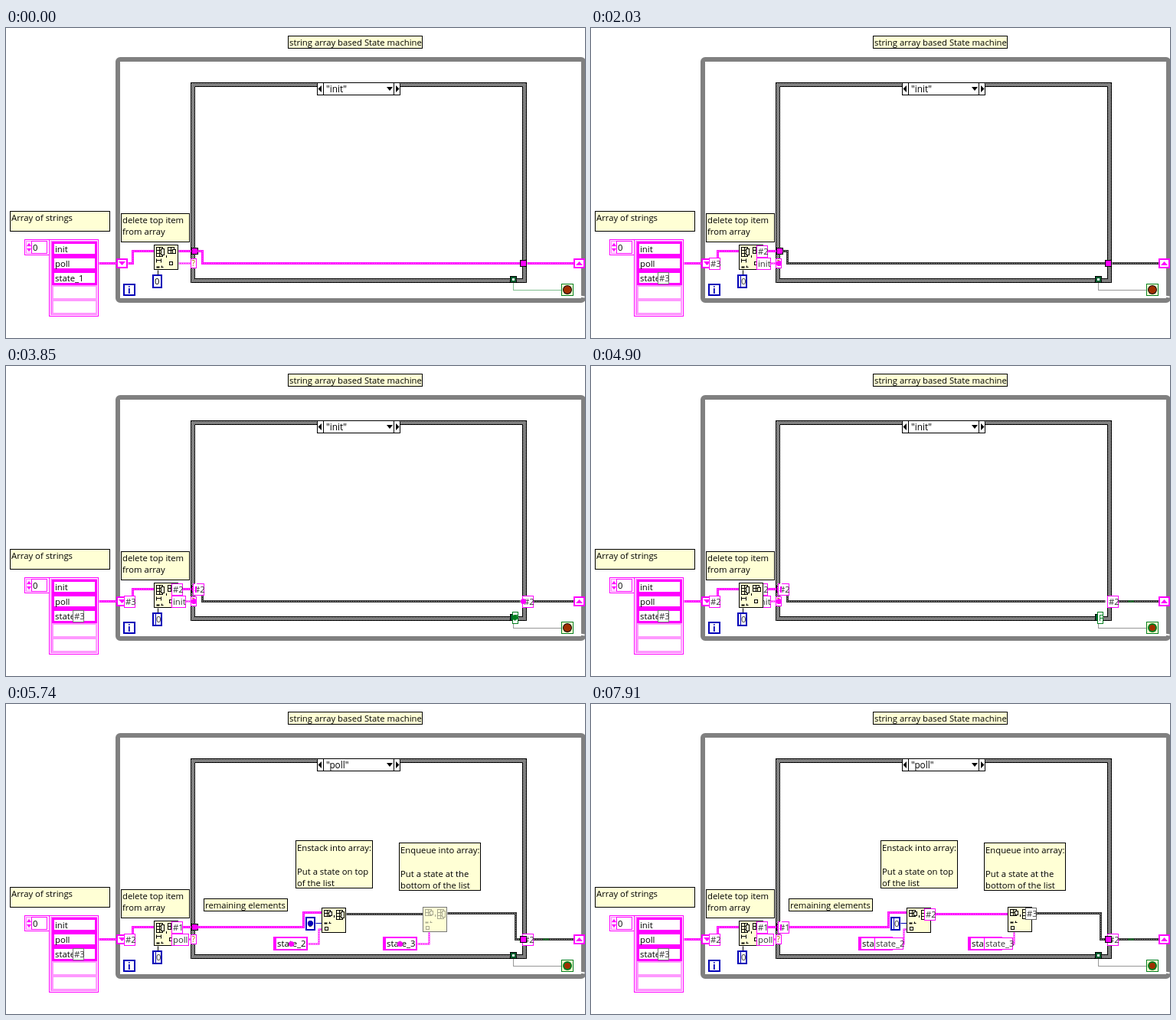
Animation, 756 px wide and 405 px high, one loop 8 s. Source, as an HTML page with a canvas:

```html
<!DOCTYPE html>
<html lang="en">
<head>
<meta charset="utf-8">
<title>State machine</title>
<style>
  html, body { margin: 0; width: 100%; height: 100%; overflow: hidden; background: #fff; }
  canvas { display: block; }
</style>
</head>
<body>
<canvas id="stage" width="756" height="405"></canvas>
<script>
const ctx = document.getElementById('stage').getContext('2d');
const LOOP = 8000, STEP = 70, STRIDE = 46;
const PINK = '#ff00ff', BLUE = '#0000b8', GREEN = '#007f1f', DARK = '#303030', CREAM = '#ffffd5';
let now = 0;

const during = (from, to = LOOP) => now >= from && now < to;

const tile = document.createElement('canvas');
tile.width = tile.height = 2;
const tileCtx = tile.getContext('2d');
tileCtx.fillStyle = '#fff';
tileCtx.fillRect(0, 0, 2, 2);
tileCtx.fillStyle = '#000';
tileCtx.fillRect(0, 0, 1, 1);
tileCtx.fillRect(1, 1, 1, 1);
const checker = ctx.createPattern(tile, 'repeat');

function rect(x, y, w, h, fill) {
  ctx.fillStyle = fill;
  ctx.fillRect(x, y, w, h);
}

function box(x, y, w, h, fill, border, line = 1) {
  rect(x, y, w, h, border);
  rect(x + line, y + line, w - 2 * line, h - 2 * line, fill);
}

function text(str, x, y, color = '#000', size = 11.3, weight = 'normal') {
  ctx.font = `${weight} ${size}px "Open Sans", "Noto Sans", sans-serif`;
  ctx.fillStyle = color;
  ctx.fillText(str, x, y);
}

function polygon(points, fill) {
  ctx.beginPath();
  points.forEach(([x, y]) => ctx.lineTo(x, y));
  ctx.fillStyle = fill;
  ctx.fill();
}

function circle(x, y, r, fill) {
  ctx.beginPath();
  ctx.arc(x, y, r, 0, 2 * Math.PI);
  ctx.fillStyle = fill;
  ctx.fill();
}

function line(points, color, width = 1, dash = []) {
  ctx.beginPath();
  points.forEach(([x, y]) => ctx.lineTo(x + .5, y + .5));
  ctx.strokeStyle = color;
  ctx.lineWidth = width;
  ctx.setLineDash(dash);
  ctx.stroke();
  ctx.setLineDash([]);
}

function arrayWire(points, color) {
  line(points, color, 3);
  line(points, color === PINK ? '#ffc0ff' : '#c8c8c8', 1, [1, 2]);
}

function stringWire(points, color) {
  line(points, color, 2);
  line(points, '#fff', 1, [1, 2]);
}

function note(x, y, w, h, rows, textX, baseline) {
  box(x, y, w, h, CREAM, '#000');
  rows.forEach((row, i) => text(row, textX, baseline + Math.round(i * 15.3)));
}

// Value shown where a wire begins
function probe(x, y, w, str, color = PINK) {
  box(x, y, w, 16, '#fff', color);
  text(str, x + 2, y + 12, color === GREEN ? GREEN : '#333');
}

// Bubble that advances a fixed stride per step and rests at the end of its path
function bubble(from, to, path, color = PINK) {
  if (!during(from, to)) return;
  let left = STRIDE * Math.floor((now - from) / STEP);
  let [x, y] = path[0];
  for (const [nextX, nextY] of path.slice(1)) {
    const length = Math.hypot(nextX - x, nextY - y);
    const part = Math.min(1, left / length);
    x += (nextX - x) * part;
    y += (nextY - y) * part;
    left -= length;
    if (left <= 0) break;
  }
  circle(x + .5, y + .5, 3.6, color);
}

function grid(x, y, cols, rows, color) {
  rect(x, y, cols * 4 + 1, rows * 4 + 1, color);
  for (let c = 0; c < cols; c++)
    for (let r = 0; r < rows; r++) rect(x + c * 4 + 1, y + r * 4 + 1, 3, 3, CREAM);
}

function smallArrow(x, y, color) {
  line([[x, y + 3], [x + 4, y + 3]], color, 2);
  line([[x + 6, y + 3], [x + 9, y + 3]], color);
  line([[x + 7, y + 1], [x + 7, y + 3]], color);
}

function deleteNode(x, y) {
  box(x, y, 32, 33, CREAM, '#000');
  grid(x + 3, y + 3, 2, 3, '#000');
  box(x + 9, y + 5, 5, 9, CREAM, '#000');
  rect(x + 16, y + 14, 1, 3, '#000');
  grid(x + 18, y + 3, 2, 2, '#000');
  box(x + 24, y + 6, 5, 6, CREAM, '#000');
  line([[x + 3, y + 18], [x + 3, y + 23]], '#000');
  line([[x + 3, y + 20], [x + 9, y + 20]], '#000');
  line([[x + 9, y + 18], [x + 9, y + 23]], '#000');
  smallArrow(x + 3, y + 26, '#000');
  box(x + 20, y + 22, 5, 5, CREAM, '#000');
}

function insertNode(x, y, dim) {
  const ink = dim ? '#a8a890' : '#000';
  box(x, y, 32, 33, CREAM, dim ? '#777' : '#000');
  grid(x + 3, y + 3, 2, 2, ink);
  box(x + 9, y + 5, 5, 6, CREAM, ink);
  rect(x + 16, y + 10, 1, 3, ink);
  grid(x + 19, y + 3, 2, 3, ink);
  box(x + 25, y + 5, 5, 9, CREAM, ink);
  smallArrow(x + 3, y + 17, ink);
  box(x + 4, y + 25, 5, 5, CREAM, ink);
}

function zeroConstant(x, y, probed) {
  box(x, y, 13, 18, '#fff', BLUE, 2);
  if (probed) {
    rect(x + 4, y + 2, 1, 14, BLUE);
    text('0', x + 5, y + 13, '#333');
  } else text('0', x + 3, y + 13);
}

function stringConstant(x, y, str) {
  box(x, y, 45, 18, '#fff', PINK, 2);
  rect(x + 2, y + 2, 2, 14, PINK);
  text(str, x + 5, y + 13);
}

function shiftRegister(x, down) {
  box(x, 301, 15, 13, '#fff', PINK, 2);
  const [base, tip] = down ? [305, 310] : [310, 305];
  polygon([[x + 3, base], [x + 12, base], [x + 7.5, tip]], PINK);
}

function tunnel(x, y, color = PINK) {
  box(x, y, 9, 9, color, '#000');
}

function arrayControl() {
  box(24, 276, 33, 21, '#fff', PINK);
  box(26, 278, 8, 17, '#ffe0ff', '#ff80ff');
  polygon([[27, 285], [33, 285], [30, 281]], PINK);
  polygon([[27, 288], [33, 288], [30, 292]], PINK);
  box(33, 278, 21, 17, '#fff', PINK);
  text('0', 35, 291);
  box(56, 276, 65, 101, '#fff', PINK);
  rect(58, 278, 61, 97, '#ff80ff');
  ['init', 'poll', 'state_1', '', ''].forEach((item, i) => {
    const y = 279 + 19 * i;
    box(60, y, 59, 19, '#fff', item ? PINK : '#ff99ff', item ? 3 : 2);
    text(item, 64, y + 14);
  });
}

function structures() {
  ctx.strokeStyle = '#808080';
  ctx.lineWidth = 6;
  ctx.beginPath();
  ctx.roundRect(146, 41, 608, 315, 3);
  ctx.stroke();
  line([[749, 350], [755, 351]], '#fff', 2);

  rect(241, 71, 439, 262, '#000');
  rect(242, 72, 437, 260, checker);
  box(246, 76, 429, 252, '#fff', '#000');

  box(406, 71, 109, 17, '#fff', '#000');
  rect(414, 71, 1, 17, '#000');
  rect(506, 71, 1, 17, '#000');
  polygon([[412, 75], [412, 84], [407.5, 79.5]], '#000');
  polygon([[509, 75], [509, 84], [513.5, 79.5]], '#000');
  polygon([[497, 77], [505, 77], [501, 82]], '#000');
  text(during(5740) ? '"poll"' : '"init"', 418, 84, '#000', 11.8);
}

function notes() {
  note(368, 10, 176, 17, ['string array based State machine'], 370, 23);
  note(5, 239, 131, 27, ['Array of strings'], 7, 252);
  note(150, 242, 90, 38, ['delete top item', 'from array'], 152, 255);
}

function loopParts() {
  const live = during(350);
  const idle = live ? DARK : PINK;
  arrayWire([[121, 307], [144, 307]], PINK);
  arrayWire([[159, 307], [165, 307], [165, 291], [193, 291]], during(350, 1470) ? DARK : PINK);
  arrayWire([[225, 291], [242, 291]], during(350, 1960) ? DARK : PINK);
  stringWire([[225, 307], [241, 307]], during(350, 1960) ? DARK : PINK);
  arrayWire([[680, 307], [741, 307]], idle);
  if (during(3990)) line([[701, 307], [709, 307]], GREEN, 2, [3, 1]);
  line([[662, 333], [662, 342], [725, 342]], live ? DARK : GREEN, 1, [1, 1]);
  line([[198, 316], [198, 322]], '#000');

  box(153, 334, 16, 16, '#fff', BLUE, 2);
  text('i', 159, 347, BLUE, 12, 'bold');
  box(725, 334, 16, 16, CREAM, GREEN);
  circle(733, 342, 6, during(3990) ? GREEN : '#000');
  circle(733, 342, during(3990) ? 4 : 5, '#a03000');
  zeroConstant(191, 322, during(1330));

  box(241, 301, 8, 13, '#fff', PINK);
  text('?', 242.5, 311, '#b06000', 10);
  tunnel(658, 324, '#006030');
  rect(661, 327, 3, 3, '#fff');
}

function initCase() {
  arrayWire([[250, 291], [256, 291], [256, 307], [671, 307]], during(350) ? DARK : PINK);
}

function pollCase() {
  note(258, 254, 110, 17, ['remaining elements'], 260, 267);
  note(378, 178, 101, 63, ['Enstack into array:', '', 'Put a state on top', 'of the list'], 380, 192);
  note(513, 181, 107, 63, ['Enqueue into array:', '', 'Put a state at the', 'bottom of the list'], 515, 195);
  arrayWire([[250, 291], [388, 291], [388, 272], [412, 272]], PINK);
  arrayWire([[444, 274], [544, 274]], during(6650) ? PINK : DARK);
  arrayWire([[576, 273], [665, 273], [665, 307], [671, 307]], DARK);
  stringWire([[394, 313], [408, 313], [408, 294], [412, 294]], PINK);
  stringWire([[537, 313], [552, 313], [552, 298]], PINK);
  line([[404, 286], [412, 286]], BLUE);
  insertNode(412, 266, false);
  insertNode(544, 265, during(0, 7070));
  zeroConstant(391, 278, during(5810));
  stringConstant(349, 304, 'state_2');
  stringConstant(492, 304, 'state_3');
  if (during(5810)) {
    probe(370, 305, 38, 'state_2');
    probe(513, 305, 38, 'state_3');
  }
  if (during(6650)) probe(435, 267, 15, '#2');
  if (during(7420)) probe(567, 266, 15, '#3', '#666');
  bubble(5740, 6370, [[397, 286], [420, 286]], BLUE);
  bubble(5740, 6370, [[372, 313], [408, 313], [408, 294], [420, 294]]);
  bubble(5740, 7070, [[514, 313], [552, 313], [552, 293]]);
  bubble(5740, 6370, [[247, 291], [388, 291], [388, 272], [420, 274]]);
  bubble(6650, 7070, [[443, 274], [552, 273]]);
  bubble(7420, LOOP, [[576, 273], [665, 273], [665, 307], [675, 307]]);
}

function outputProbes() {
  if (!during(1960)) return;
  const second = during(5180);
  probe(216, 284, 15, second ? '#1' : '#2');
  probe(216, 300, second ? 23 : 19, second ? 'poll' : 'init');
}

function probes() {
  const clipped = during(4900, 5180);
  if (clipped) outputProbes();
  deleteNode(193, 283);
  if (!clipped) outputProbes();

  if (during(630)) probe(87, 319, 15, '#3', '#777');
  if (during(1330)) probe(154, 300, 15, during(4550) ? '#2' : '#3');

  if (during(2590, 5740) || during(5810)) {
    probe(244, 284, 15, during(5740) ? '#1' : '#2');
    if (during(3570, 5740) || during(7910)) {
      rect(247, 284, 2, 15, '#fff');
      rect(247, 288, 2, 8, PINK);
    }
  }
  if (during(3850)) probe(674, 300, 15, '#2');
  if (!during(3850, 5460)) tunnel(671, 303);
  if (during(3850, 5460)) probe(661, 321, 8, 'F', GREEN);
}

function bubbles() {
  const intoDelete = [[165, 294], [165, 291], [201, 291]];
  const toTunnel = [[229, 291], [246, 291]];
  const toSelector = [[229, 307], [245, 307]];
  bubble(630, 1330, [[95, 319], [95, 307], [153, 307]]);
  bubble(1330, 1680, intoDelete);
  bubble(1330, 1680, [[201, 311]], '#002080');
  bubble(1960, 2590, toTunnel);
  bubble(1960, 5180, toSelector);
  bubble(2590, 3850, [[256, 306], [256, 307], [675, 307]]);
  bubble(3850, 4550, [[675, 307], [744, 307]]);
  bubble(3850, 3990, [[664, 328], [664, 342], [733, 342]], GREEN);
  bubble(4550, 4900, intoDelete);
  bubble(5180, 5740, toTunnel);
  bubble(5180, 5740, toSelector);
}

function draw() {
  now = performance.now() % LOOP;
  rect(0, 0, 756, 405, '#fff');
  structures();
  notes();
  arrayControl();
  loopParts();
  shiftRegister(144, true);
  tunnel(242, 287);
  if (during(5740)) pollCase();
  else initCase();
  probes();
  bubbles();
  shiftRegister(741, false);
  requestAnimationFrame(draw);
}
draw();
</script>
</body>
</html>
```
